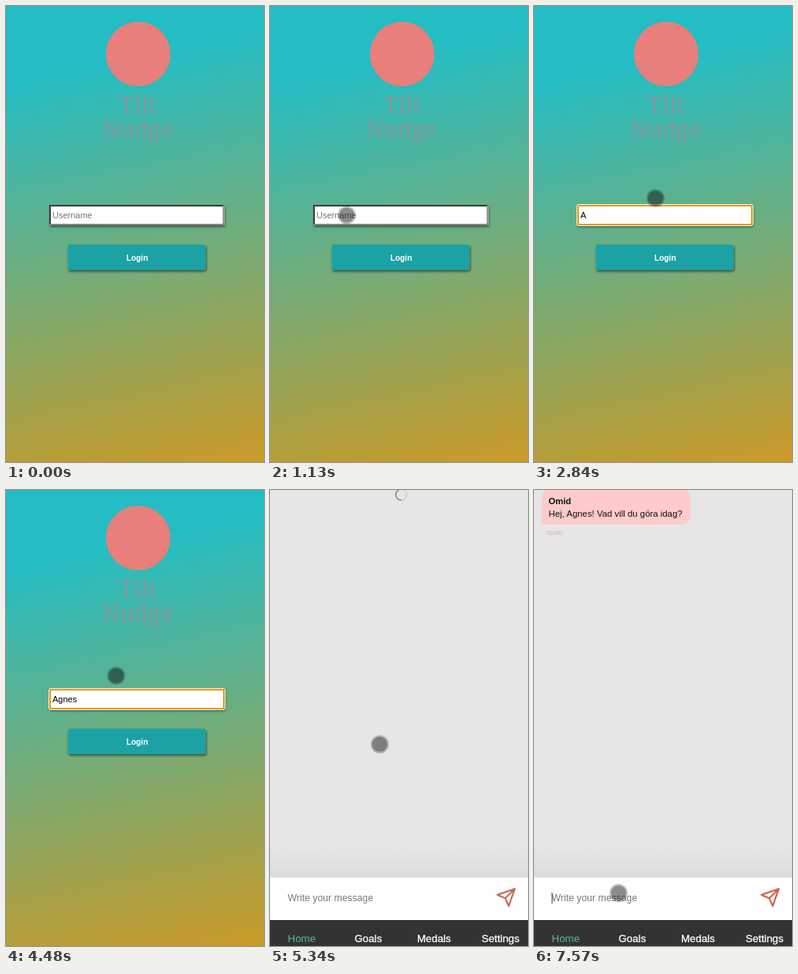
An HTML page that plays this animation: 328 px wide and 580 px high, repeating every 8000 ms.

```html
<!DOCTYPE html>
<html lang="en">
<head>
<meta charset="utf-8">
<title>Login and chat</title>
<style>
  html, body { margin: 0; width: 100%; height: 100%; overflow: hidden; }
  svg { display: block; width: 100vw; height: 100vh; }
  text { font-family: "Liberation Sans", Arial, sans-serif; white-space: pre; }
  .logo text { font: 29px "Noto Serif", serif; fill: #87979c; text-anchor: middle; }
  .nav text { font-size: 13.33px; fill: #fff; stroke: #fff; stroke-width: .3; }
  .nav .active { fill: #5cb88c; stroke: none; }
</style>
</head>
<body>
<svg viewBox="0 0 328 580">
  <defs>
    <linearGradient id="sky" gradientUnits="userSpaceOnUse" x1="98" y1="-21" x2="230" y2="601">
      <stop offset=".15" stop-color="#24bdc4"/>
      <stop offset="1" stop-color="#cb9a27"/>
    </linearGradient>
    <linearGradient id="fade" x2="0" y2="1">
      <stop offset="0" stop-color="#000" stop-opacity="0"/>
      <stop offset="1" stop-color="#000" stop-opacity=".045"/>
    </linearGradient>
    <filter id="shadow" x="-10%" y="-50%" width="120%" height="200%">
      <feDropShadow dx="1" dy="2" stdDeviation="1.8" flood-color="#000" flood-opacity=".5"/>
    </filter>
  </defs>

  <g id="login">
    <rect width="328" height="580" fill="url(#sky)"/>
    <g class="logo">
      <circle cx="168" cy="61" r="41" fill="#e87f7b"/>
      <text x="168" y="136">Tilt</text>
      <text x="167" y="167">Nudge</text>
    </g>
    <rect x="55" y="253" width="222.5" height="26" fill="#fff" filter="url(#shadow)"/>
    <path id="bevelDark" d="M55 279V253H277.5l-2 2H57V277z" fill="#3c3c3c"/>
    <path id="bevelLight" d="M55 279H277.5V253l-2 2V277H57z" fill="#858585"/>
    <g id="fieldRing" fill="none">
      <rect x="54.5" y="252.5" width="224" height="27" rx="2.5" stroke="#fbf1dc"/>
      <rect x="56" y="254" width="221" height="24" rx="1.5" stroke="#e59a12" stroke-width="2"/>
    </g>
    <text id="user" x="59" y="270" font-size="11"></text>
    <rect id="userCaret" y="259.5" width="1" height="13" fill="#000"/>
    <rect x="78.5" y="303.5" width="175.5" height="32.5" rx="3" fill="#1ea2a5" filter="url(#shadow)"/>
    <g id="buttonRing" fill="none">
      <rect x="77.5" y="301.8" width="178" height="36" rx="3.5" stroke="#fff3d8"/>
      <rect x="78.8" y="303.1" width="175.4" height="33.4" rx="2.5" stroke="#e5a02a" stroke-width="1.6"/>
    </g>
    <text x="166.8" y="324" font-size="10.2" font-weight="700" fill="#fff" text-anchor="middle">Login</text>
  </g>

  <g id="chat">
    <rect width="328" height="580" fill="#e6e6e6"/>
    <g id="spinner" fill="none" stroke-width="1.6">
      <circle cx="167" cy="6" r="7" stroke="#cecece"/>
      <path d="M167 13A7 7 0 0 1 160 6A7 7 0 0 1 163.5 -.06" stroke="#8d8d8d"/>
    </g>
    <g id="message">
      <path d="M10 44V10a13 13 0 0 1 13-13H186a13 13 0 0 1 13 13V31a13 13 0 0 1-13 13z" fill="#ffcaca"/>
      <text x="18.5" y="18" font-size="11.2" font-weight="700" fill="#111">Omid</text>
      <text x="18.5" y="34" font-size="11.4" fill="#111">Hej, Agnes! Vad vill du göra idag?</text>
      <text x="16" y="57" font-size="8" fill="#d0abab">00:00</text>
    </g>
    <rect y="455" width="328" height="38" fill="url(#fade)"/>
    <rect y="493" width="328" height="54" fill="#fff"/>
    <text x="22.5" y="523" font-size="12.25" fill="#7b7b7b">Write your message</text>
    <rect id="chatCaret" x="22.5" y="512" width="1" height="14" fill="#333"/>
    <g id="send" transform="translate(287 505) scale(1.1)" fill="none" stroke-width="2" stroke-linejoin="round" stroke-linecap="round">
      <path d="M22 2L11 13M22 2L15 22L11 13L2 9z"/>
    </g>
    <g class="nav">
      <rect y="547" width="328" height="33" fill="#333"/>
      <text class="active" x="22.5" y="575">Home</text>
      <text x="107.5" y="575">Goals</text>
      <text x="187" y="575">Medals</text>
      <text x="269" y="575">Settings</text>
    </g>
  </g>

  <g id="cursor">
    <circle r="11.5" fill="#000" fill-opacity=".24"/>
    <circle r="9.6" fill="#000" fill-opacity=".28"/>
  </g>
</svg>
<script>
const LOOP = 8000, STEP = 76;
const OPEN_CHAT = 5340, REPLY = 6180;
const NAME = "Agnes";
const keyTimes = [2440, 3460, 3690, 3860, 3930];
const caretOn = [[1340, 1830], [2360, 2840], [3370, 4480]];

// Cursor moves: start, end, number of steps, cubic Bezier points
const moves = [
  { from: 290, to: 1050, steps: 11, path: [[276, 582], [235, 470], [150, 330], [100.5, 271.5]] },
  { from: 1130, to: 1130, steps: 1, path: [[100.5, 271.5], [99, 270], [98, 267], [97.5, 266]] },
  { from: 1590, to: 1660, steps: 2, path: [[97.5, 266], [115, 259], [135, 250], [154.5, 244.5]] },
  { from: 4480, to: 5020, steps: 8, path: [[154.5, 244.5], [100, 195], [70, 372], [139.5, 323.5]] },
  { from: 6800, to: 7330, steps: 8, path: [[139.5, 323.5], [140, 390], [91, 460], [107.5, 512.5]] }
];

const $ = id => document.getElementById(id);
const show = (id, on) => $(id).setAttribute("visibility", on ? "inherit" : "hidden");
const within = (t, a, b) => t >= a && t < b;

function bezier([a, b, c, d], p) {
  const q = 1 - p;
  return [0, 1].map(i => q*q*q*a[i] + 3*q*q*p*b[i] + 3*q*p*p*c[i] + p*p*p*d[i]);
}

function cursorAt(t) {
  const move = moves.filter(m => t >= m.from).pop();
  if (!move) return null;
  const { from, to, steps, path } = move;
  const gap = (to - from) / Math.max(1, steps - 1) || 1;
  const step = Math.min(steps, Math.floor((t - from) / gap + 1e-6) + 1);
  const p = step / steps;
  return bezier(path, .6 * p + .4 * p * p * (3 - 2 * p));
}

function drawLogin(t) {
  const typed = NAME.slice(0, keyTimes.filter(k => t >= k).length);
  const focused = within(t, 1340, 5170);
  const user = $("user");
  const label = typed || "Username";
  if (user.textContent !== label) user.textContent = label;
  user.setAttribute("fill", typed ? "#000" : "#7c7670");
  $("userCaret").setAttribute("x", 58.5 + (typed ? user.getComputedTextLength() : 0));
  show("userCaret", caretOn.some(([a, b]) => within(t, a, b)));
  show("fieldRing", focused);
  show("bevelDark", !focused);
  show("bevelLight", !focused);
  show("buttonRing", t >= 5170);
}

function drawChat(t) {
  const turn = Math.floor((t - OPEN_CHAT) / STEP) * STEP * .36;
  $("spinner").setAttribute("transform", `rotate(${turn} 167 6)`);
  show("spinner", t < REPLY);
  show("message", t >= REPLY);
  const shown = Math.min(3, Math.floor((t - REPLY) / 80) + 1) / 3;
  $("message").setAttribute("opacity", Math.max(0, shown));
  $("send").setAttribute("stroke", t < REPLY ? "#c86c59" : "#d2664b");
  show("chatCaret", t >= 7500);
}

function draw(t) {
  const chatting = t >= OPEN_CHAT;
  show("login", !chatting);
  show("chat", chatting);
  if (chatting) drawChat(t);
  else drawLogin(t);
  const pos = cursorAt(t);
  show("cursor", pos);
  if (pos) $("cursor").setAttribute("transform", `translate(${pos})`);
}

const start = performance.now();
function tick() {
  draw((performance.now() - start) % LOOP);
  requestAnimationFrame(tick);
}
tick();
</script>
</body>
</html>
```
